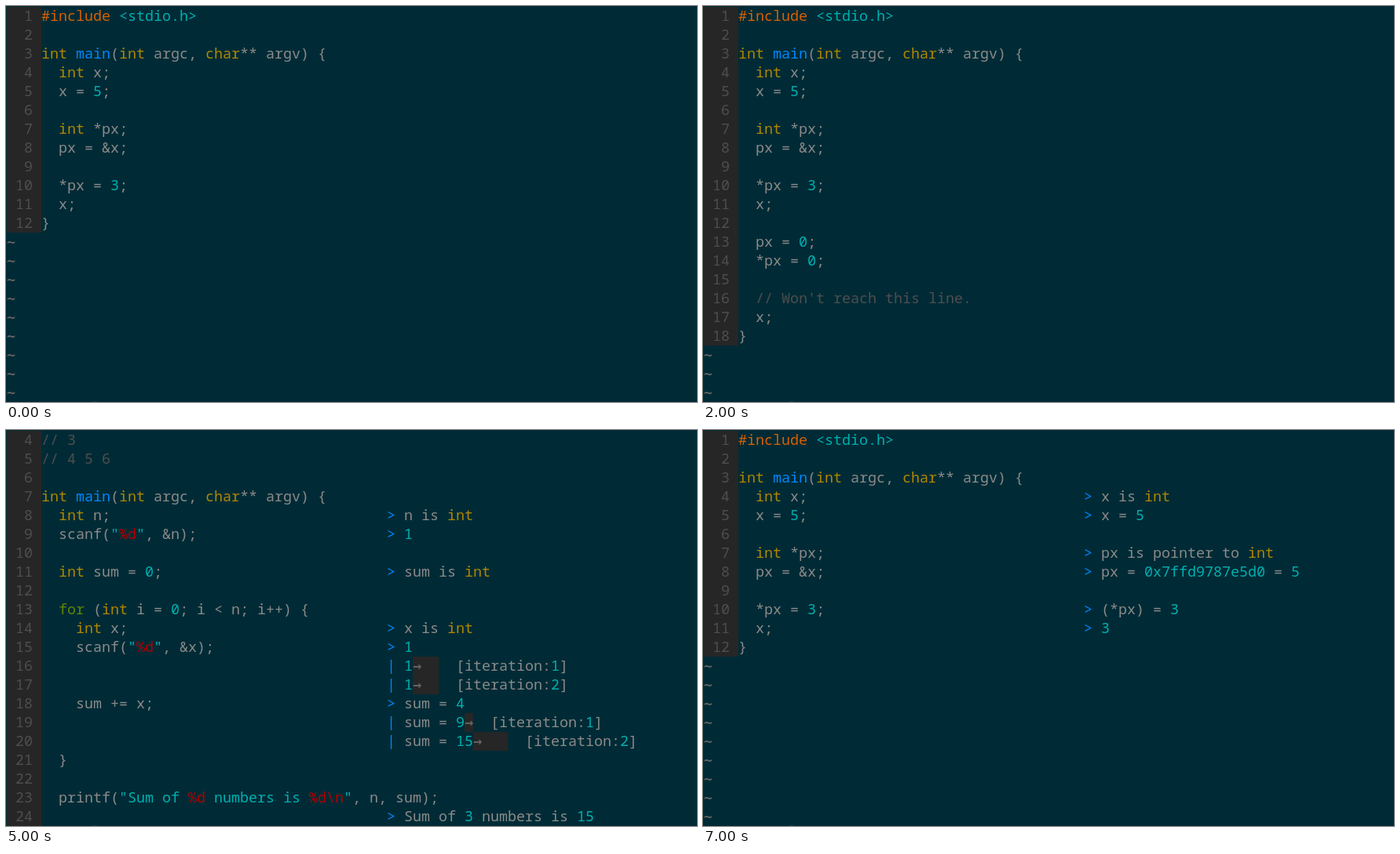
Write an HTML page that moves like this. It is 880 by 505 pixels and loops after 8 s.

```html
<!DOCTYPE html>
<html lang="en">
<head>
<meta charset="utf-8">
<title>C scratchpad</title>
<style>
html, body { margin: 0; width: 100%; height: 100%; overflow: hidden; background: #002b36; }
svg { display: block; }
text { font: 18.333px "Noto Sans Mono", "DejaVu Sans Mono", monospace; white-space: pre; font-variant-ligatures: none; }
.mark { font-family: "DejaVu Sans Mono", monospace; font-weight: bold; }
</style>
</head>
<body>
<svg id="stage" width="880" height="505" viewBox="0 0 880 505"></svg>
<script>
const CELL = 11, ROW = 24, ROWS = 21, CODE = 4, OUT = 44;
const C = {
  text: '#8a8a8a', dim: '#4e4e4e', mark: '#626262', gutter: '#262626', cyan: '#00afaf',
  yellow: '#af8700', blue: '#0087ff', orange: '#d75f00', green: '#5f8700', red: '#af0000'
};
const stage = document.getElementById('stage');

function add(parent, tag, attrs, content) {
  const el = document.createElementNS('http://www.w3.org/2000/svg', tag);
  for (const k in attrs) el.setAttribute(k, attrs[k]);
  if (content) el.textContent = content;
  parent.appendChild(el);
  return el;
}

const px = col => 1 + col * CELL;
const put = (g, row, col, s, fill) =>
  add(g, 'text', { x: px(col), y: row * ROW + 19, fill }, s);
const mark = (g, row, col, s) =>
  put(g, row, col, s, C.mark).setAttribute('class', 'mark');
const block = (g, row, col, w, h) =>
  add(g, 'rect', { x: px(col), y: 1 + row * ROW, width: w * CELL, height: h * ROW, fill: C.gutter });

// Each rule pairs a pattern with its colour; whatever matches none is plain text.
const codeRules = [
  [/^\/\/.*/, C.dim], [/^#include/, C.orange], [/^<stdio\.h>/, C.cyan],
  [/^(int|char)\b/, C.yellow], [/^main\b/, C.blue], [/^for\b/, C.green], [/^\d+/, C.cyan]
];
const stringRules = [[/^(%d|\\n)/, C.red], [/^[^%\\]+/, C.cyan]];
const outRules = [
  [/^[>|](?= )/, C.blue], [/^int\b/, C.yellow], [/^(0x[\da-f]+|\d+)/, C.cyan]
];

function paint(g, row, col, s, rules) {
  while (s) {
    const str = rules === codeRules && s.match(/^"[^"]*"/);
    const rule = rules.find(r => r[0].test(s));
    const part = (str || s.match(rule ? rule[0] : /^(\w+|\s+|.)/))[0];
    if (str) paint(g, row, col, part, stringRules);
    else if (part.trim()) put(g, row, col, part, rule ? rule[1] : C.text);
    col += part.length;
    s = s.slice(part.length);
  }
}

// A tab in an output shows as an arrow on a shaded run up to the next stop.
function paintOut(g, row, s) {
  const [head, tail] = s.split('\t');
  paint(g, row, OUT, head, outRules);
  if (!tail) return;
  const col = OUT + head.length, width = 4 - (head.length + 2) % 4;
  block(g, row, col, width, 1);
  mark(g, row, col, '→');
  paint(g, row, col + width + 2, tail, outRules);
}

function screen(source, outs = {}, first = 1) {
  const g = add(stage, 'g', { visibility: 'hidden' });
  const lines = source.split('\n').slice(first - 1);
  block(g, 0, 0, CODE, lines.length);
  for (let row = 0; row < ROWS; row++) {
    if (row >= lines.length) {
      mark(g, row, 0, '~');
      continue;
    }
    const n = row + first;
    put(g, row, n < 10 ? 2 : 1, String(n), C.dim);
    paint(g, row, CODE, lines[row], codeRules);
    if (outs[n]) paintOut(g, row, outs[n]);
  }
  return g;
}

const pointer = `#include <stdio.h>

int main(int argc, char** argv) {
  int x;
  x = 5;

  int *px;
  px = &x;

  *px = 3;
  x;
}`;

const crash = pointer.slice(0, -1) + `
  px = 0;
  *px = 0;

  // Won't reach this line.
  x;
}`;

const sum = String.raw`#include <stdio.h>

//IN:
// 3
// 4 5 6

int main(int argc, char** argv) {
  int n;
  scanf("%d", &n);

  int sum = 0;

  for (int i = 0; i < n; i++) {
    int x;
    scanf("%d", &x);
    sum += x;
  }

  printf("Sum of %d numbers is %d\n", n, sum);
}`;

// Extra rows make room for the repeated outputs of the loop body.
const sumWide = sum
  .replace('&x);\n', '&x);\n\n\n')
  .replace('+= x;\n', '+= x;\n\n\n')
  .replace(/\n}$/, '\n');

const pointerOut = {
  4: '> x is int', 5: '> x = 5', 7: '> px is pointer to int',
  8: '> px = 0x7ffd9787e5d0 = 5', 10: '> (*px) = 3', 11: '> 3'
};
const crashOut = { ...pointerOut, 13: '> px = 0x0', 14: '> Segmentation fault' };
const sumOut = {
  8: '> n is int', 9: '> 1', 11: '> sum is int', 14: '> x is int', 15: '> 1',
  16: '| 1\t[iteration:1]', 17: '| 1\t[iteration:2]',
  18: '> sum = 4', 19: '| sum = 9\t[iteration:1]', 20: '| sum = 15\t[iteration:2]',
  24: '> Sum of 3 numbers is 15'
};

const plain = screen(pointer), run = screen(pointer, pointerOut);
const order = [
  plain, run, screen(crash), screen(crash, crashOut),
  screen(sum), screen(sumWide, sumOut, 4), plain, run
];
add(stage, 'rect', { x: 110, y: 504, width: 6, height: 1, fill: '#0b4144' });

let shown;
function draw(ms) {
  const next = order[Math.floor(ms / 1000) % order.length];
  if (next === shown) return;
  if (shown) shown.setAttribute('visibility', 'hidden');
  next.setAttribute('visibility', 'visible');
  shown = next;
}

const start = performance.now();
function tick() {
  draw(performance.now() - start);
  requestAnimationFrame(tick);
}
tick();
</script>
</body>
</html>
```
